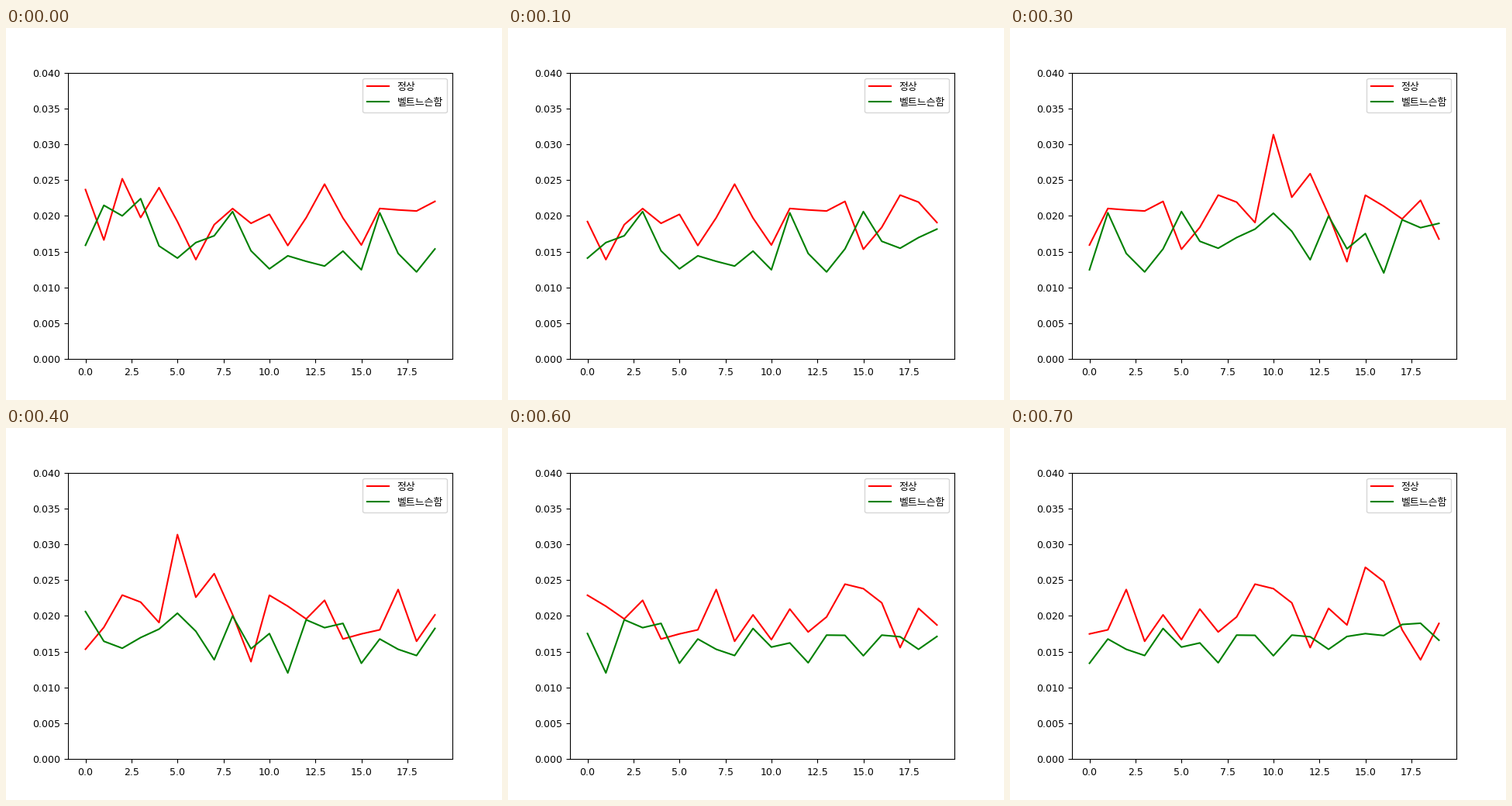
A matplotlib script that plays this animation: 640 px wide and 480 px high, repeating every 800 ms.

```python
import matplotlib.pyplot as plt
import numpy as np
from matplotlib.animation import FuncAnimation
from matplotlib.lines import Line2D
from matplotlib.patches import FancyBboxPatch
from matplotlib.transforms import IdentityTransform

WIDTH, HEIGHT, DPI = 640, 480, 100
WINDOW, STEP, FRAMES, INTERVAL = 20, 5, 8, 100

plt.rcParams["font.family"] = "DejaVu Sans"

# Vibration levels, in units of 1e-5
NORMAL = np.array([
    2367, 1663, 2519, 1977, 2394, 1920, 1389, 1877, 2102, 1896, 2021,
    1586, 1974, 2443, 1970, 1593, 2103, 2083, 2068, 2202, 1534, 1840,
    2290, 2192, 1907, 3135, 2260, 2589, 2018, 1360, 2288, 2135, 1957,
    2217, 1677, 1748, 1805, 2368, 1645, 2014, 1668, 2095, 1775, 1985,
    2443, 2380, 2182, 1557, 2105, 1873, 2678, 2480, 1805, 1386, 1894,
]) * 1e-5
LOOSE_BELT = np.array([
    1589, 2147, 2000, 2240, 1580, 1410, 1627, 1722, 2060, 1512, 1260,
    1442, 1365, 1299, 1508, 1247, 2043, 1475, 1217, 1538, 2060, 1645,
    1548, 1697, 1815, 2037, 1785, 1387, 1998, 1540, 1753, 1203, 1945,
    1835, 1895, 1338, 1677, 1533, 1446, 1824, 1564, 1622, 1345, 1731,
    1728, 1443, 1731, 1708, 1533, 1712, 1752, 1725, 1880, 1897, 1660,
]) * 1e-5
SERIES = [("정상", "red", NORMAL), ("벨트느슨함", "green", LOOSE_BELT)]

fig, ax = plt.subplots(figsize=(WIDTH / DPI, HEIGHT / DPI), dpi=DPI)
pixels = IdentityTransform()

x = np.arange(WINDOW)
lines = [ax.plot(x, data[:WINDOW], color=color)[0] for _, color, data in SERIES]
ax.set_xlim(-0.95, 19.95)
ax.set_ylim(0, 0.04)
ax.set_xticks(np.arange(0, 20, 2.5))
ax.set_yticks(np.arange(0, 0.041, 0.005))
ax.xaxis.set_major_formatter("{x:.1f}")
ax.yaxis.set_major_formatter("{x:.3f}")
ax.tick_params(labelsize=9)
ax.tick_params(axis="x", pad=4.5)


def draw_legend(left, top, right, bottom):
    ax.add_artist(FancyBboxPatch(
        (left, HEIGHT - bottom), right - left, bottom - top,
        boxstyle="round,pad=0,rounding_size=2.8", transform=pixels,
        fc="white", ec="0.8", alpha=0.8, lw=1, snap=True, zorder=5))
    for row, (label, color, _) in enumerate(SERIES):
        y = HEIGHT - top - 10.3 - 20.2 * row
        ax.add_artist(Line2D([left + 5.5, left + 33.3], [y, y], color=color,
                             transform=pixels, zorder=6))
        ax.text(left + 44.2, y - 5.2, label, transform=pixels, fontsize=9.3,
                family="Noto Sans CJK JP", va="baseline", zorder=6)


def update(frame):
    start = frame * STEP
    for line, (_, _, data) in zip(lines, SERIES):
        line.set_ydata(data[start:start + WINDOW])
    return lines


draw_legend(460.3, 64.6, 569.1, 109.4)
animation = FuncAnimation(fig, update, frames=FRAMES, interval=INTERVAL,
                          repeat=True, repeat_delay=0)
plt.show()
```
